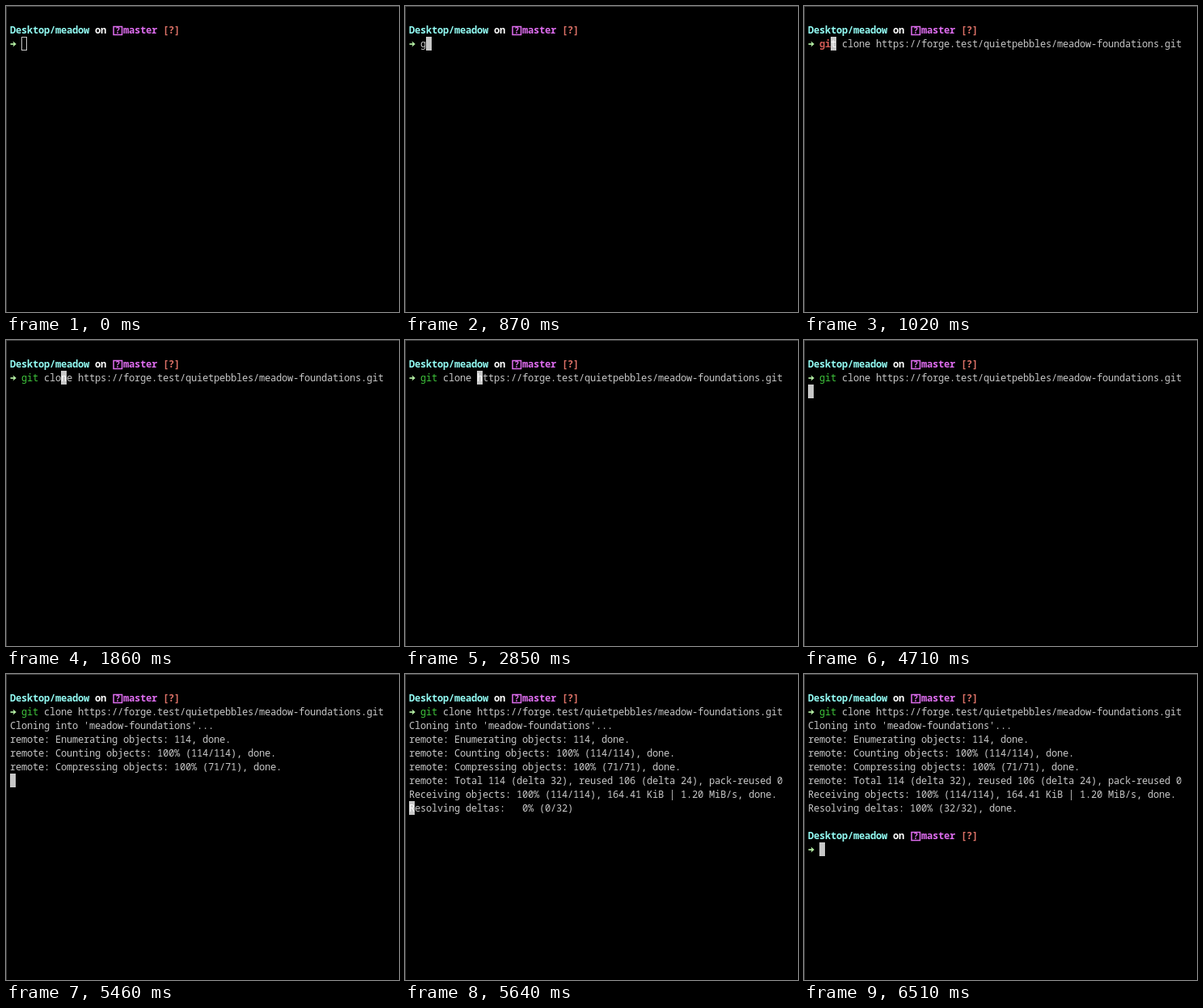
Recreate the animation shown at these times as an HTML page with a canvas. Size 486 px wide and 378 px high, loop 7080 ms.

```html
<!DOCTYPE html>
<html lang="en">
<head>
<meta charset="utf-8">
<title>Terminal</title>
<style>
html, body { margin: 0; width: 100%; height: 100%; overflow: hidden; background: #000; }
canvas { display: block; }
</style>
</head>
<body>
<canvas id="screen" width="486" height="378"></canvas>
<script>
const ctx = document.getElementById('screen').getContext('2d');
const LOOP = 7080, CELL = 7, ROW = 17, LEFT = 5, TOP = 21;
const FACE = '"Noto Sans Mono", "DejaVu Sans Mono", monospace';
const C = {
  text: '#c7c7c7', cyan: '#93fcf4', white: '#ffffff', pink: '#df6df0',
  salmon: '#dd7267', red: '#d05a54', green: '#3fc53c', arrow: '#b4eea4'
};

const REPO = 'meadow-foundations';
const VERB = 'git clone ';
const URL_TEXT = `https://forge.test/quietpebbles/${REPO}.git`;
const COMMAND = VERB + URL_TEXT;
const KEY_TIMES = [870, 1020, 1050, 1260, 1470, 1650, 1860, 2520, 2730, 2850];
const FOCUS = 300, SUGGEST = 1020, PASTE = 3780, ENTER = 4710, DONE = 6510;

const REMOTE = [
  'remote: Enumerating objects: 114, done.',
  'remote: Counting objects: 100% (114/114), done.',
  'remote: Compressing objects: 100% (71/71), done.'
];
const TOTAL = 'remote: Total 114 (delta 32), reused 106 (delta 24), pack-reused 0';
const RECEIVED = 'Receiving objects: 100% (114/114), 164.41 KiB | 1.20 MiB/s, done.';

const xOf = col => LEFT + col * CELL;
const yOf = row => TOP + row * ROW;

function progress(label, done, total) {
  const pct = String(Math.floor(done / total * 100)).padStart(3);
  return `${label}: ${pct}% (${done}/${total})`;
}

function put(str, col, row, color = C.text, weight = 400) {
  ctx.font = `${weight} 12px ${FACE}`;
  ctx.fillStyle = color;
  [...str].forEach((ch, i) => ctx.fillText(ch, xOf(col + i), yOf(row) + 13));
}

function block(col, row, width = 1) {
  ctx.fillStyle = C.text;
  ctx.fillRect(xOf(col), yOf(row), width * CELL, ROW);
}

function cursor(col, row, under = '') {
  block(col, row);
  put(under, col, row, C.white);
}

function hollowCursor(col, row) {
  ctx.strokeStyle = C.text;
  ctx.lineWidth = 1;
  ctx.strokeRect(xOf(col) + 0.5, yOf(row) + 0.5, CELL - 1, ROW - 1);
}

function missingGlyph(x, y) {
  ctx.strokeStyle = C.pink;
  ctx.lineWidth = 1.5;
  ctx.strokeRect(x + 0.5, y + 0.5, 10.5, 10);
  ctx.font = `700 10px ${FACE}`;
  ctx.fillStyle = C.pink;
  ctx.fillText('?', x + 2.8, y + 9.2);
}

function arrow(row) {
  const y = yOf(row) + 9;
  ctx.fillStyle = C.arrow;
  ctx.fillRect(5.5, y - 0.8, 5, 1.7);
  ctx.beginPath();
  ctx.moveTo(8.6, y - 3.4);
  ctx.lineTo(12.8, y);
  ctx.lineTo(8.6, y + 3.4);
  ctx.lineTo(9.6, y);
  ctx.fill();
}

function prompt(row) {
  put('Desktop/meadow', 0, row, C.cyan, 600);
  put('on', 15, row, C.white, 600);
  missingGlyph(132.5, yOf(row) + 4);
  put('master', 20, row, C.pink, 600);
  put('[?]', 27, row, C.salmon, 600);
  arrow(row + 1);
}

function verbColor(t) {
  if (t < 900 || (t >= PASTE && t < PASTE + 30)) return C.text;
  return t < 1080 ? C.red : C.green;
}

function commandLine(t) {
  const typed = KEY_TIMES.filter(k => t >= k).length;
  const pasted = t >= PASTE;
  const lit = pasted && t < ENTER;
  const shown = t >= SUGGEST ? COMMAND.length : typed;
  const head = Math.min(typed, 3);
  const color = verbColor(t);

  put(COMMAND.slice(0, head), 2, 1, color, color === C.red ? 600 : 400);
  put(COMMAND.slice(head, Math.min(shown, VERB.length)), 2 + head, 1);
  if (lit) block(2 + VERB.length, 1, URL_TEXT.length + 1);
  if (shown > VERB.length) put(URL_TEXT, 2 + VERB.length, 1, lit ? '#000' : C.text);

  if (t < FOCUS) hollowCursor(2, 1);
  else if (!pasted) cursor(2 + typed, 1, COMMAND.slice(typed, Math.min(typed + 1, shown)));
}

function outputLines(t) {
  if (t < 4740) return [];
  const lines = [`Cloning into '${REPO}'...`];
  if (t < 5460) return lines;
  lines.push(...REMOTE);
  if (t < 5490) return lines;
  if (t < 5520) return [...lines, progress('Receiving objects', 2, 114)];
  lines.push(TOTAL);
  if (t < 5640) return [...lines, progress('Receiving objects', 78, 114)];
  lines.push(RECEIVED);
  if (t < 5670) return [...lines, progress('Resolving deltas', 0, 32)];
  return [...lines, progress('Resolving deltas', 32, 32) + ', done.'];
}

function output(t) {
  const lines = outputLines(t);
  lines.forEach((line, i) => put(line, 0, 2 + i));
  if (t >= DONE) {
    prompt(10);
    cursor(2, 11);
    return;
  }
  // A running progress line keeps the cursor on its first column.
  const last = lines[lines.length - 1] || '';
  const running = /\)$/.test(last);
  cursor(0, 2 + lines.length - (running ? 1 : 0), running ? last[0] : '');
}

function draw(t) {
  ctx.fillStyle = '#000';
  ctx.fillRect(0, 0, 486, 378);
  ctx.fillStyle = '#3d3d3d';
  ctx.fillRect(0, 0, 486, 1);
  ctx.fillRect(0, 0, 1, 378);
  prompt(0);
  commandLine(t);
  if (t >= ENTER) output(t);
}

const start = performance.now();
function tick() {
  draw((performance.now() - start) % LOOP);
  requestAnimationFrame(tick);
}
tick();
</script>
</body>
</html>
```
